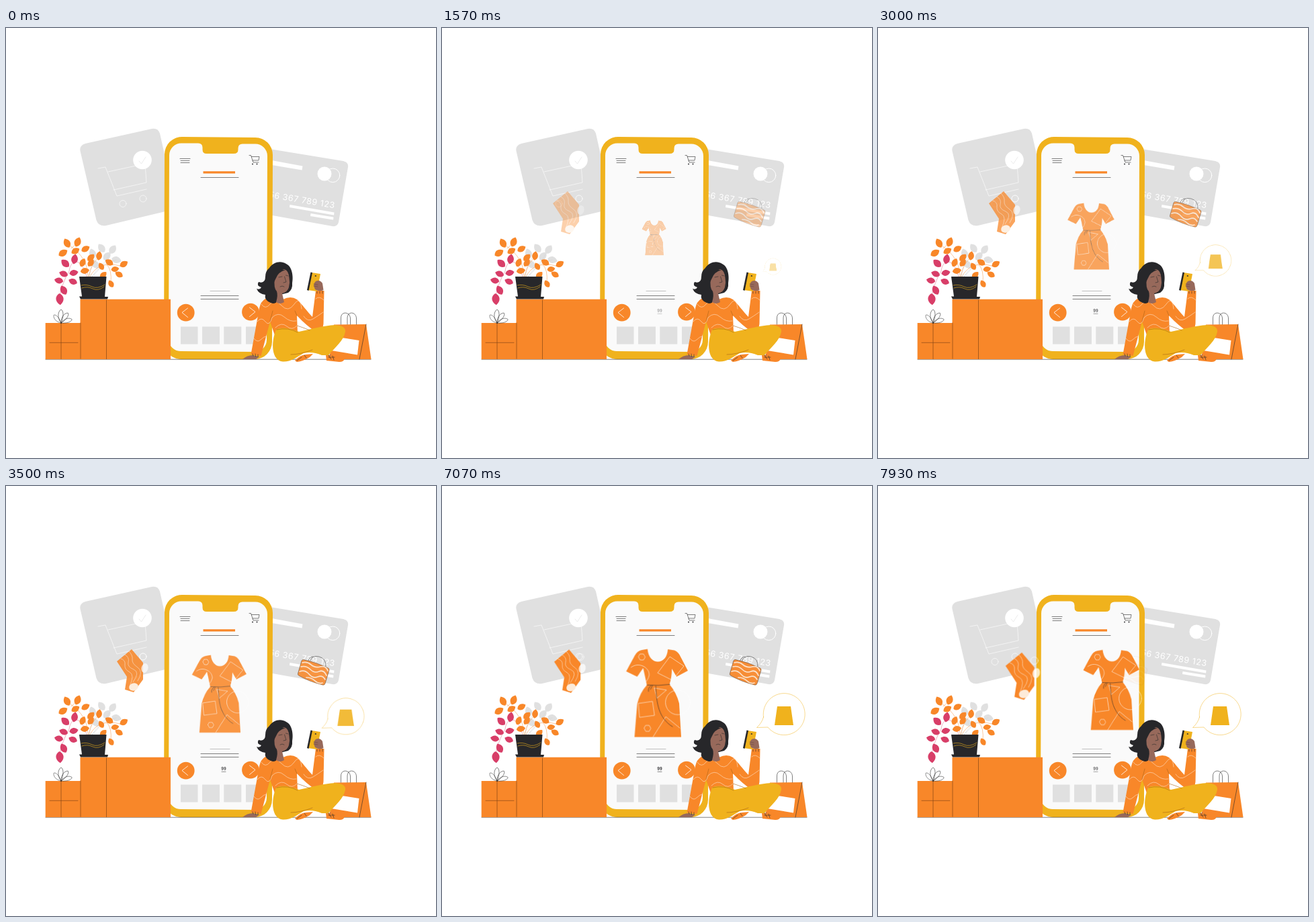
Write an HTML page that moves like this. It is 640 by 640 pixels and loops after 8000 ms.

```html
<!DOCTYPE html>
<html lang="en">
<head>
<meta charset="utf-8">
<title>Mobile shopping</title>
<style>
  html, body { margin: 0; width: 100%; height: 100%; overflow: hidden; background: #fff; }
  svg { display: block; width: 100%; height: 100%; }

  .o { fill: #f88729; }
  .y { fill: #f0b21d; }
  .g { fill: #e0e0e0; }
  .k { fill: #27272a; }
  .p { fill: #d83e68; }
  .b { fill: #97695b; }
  .w { fill: #fff; }
  .line { fill: none; stroke: #2b2b2b; stroke-width: .6; stroke-linecap: round; stroke-linejoin: round; }
  .white { stroke: #fff; }
  .pale { stroke: #fde3cb; }
  .gold { stroke: #f0b21d; }

  .dress, .sock, .bag, .bubble, .price { animation: 8s linear infinite; }
  .dress { transform-origin: 314.2px 314.6px; animation-name: dress; }
  .sock { transform-origin: 187px 275px; animation-name: sock; }
  .bag { animation-name: bag; }
  .bubble { transform-origin: 482px 365px; animation-name: bubble; }
  .price { animation-name: price; }

  @keyframes dress {
    0% { opacity: 0; transform: translate(0, 0) scale(0); }
    50%, 87.5% { opacity: 1; transform: translate(0, 0) scale(1); }
    100% { opacity: 1; transform: translate(32px, -6px) scale(.896); }
  }
  @keyframes sock {
    0% { opacity: 0; transform: translate(0, 0) scale(1); }
    50%, 87.5% { opacity: 1; transform: translate(0, 0) scale(1); }
    100% { opacity: 1; transform: translate(29px, 8.6px) scale(1.108); }
  }
  @keyframes bag {
    0% { opacity: 0; transform: translate(0, 0); }
    50%, 87.5% { opacity: 1; transform: translate(0, 0); }
    100% { opacity: 0; transform: translate(-86px, 0); }
  }
  @keyframes bubble {
    0% { opacity: 0; transform: scale(0); }
    50%, 100% { opacity: 1; transform: scale(1); }
  }
  @keyframes price {
    0% { opacity: 0; }
    50%, 87.5% { opacity: 1; }
    100% { opacity: .7; }
  }
</style>
</head>
<body>
<svg viewBox="0 0 640 640">
  <defs>
    <path id="leaf" d="M0-8C7-3 6 4 0 7C-6 4-7-3 0-8Z"/>
    <path id="petal" d="M0 0C-7-9-4-18 0-20C4-18 4-9 0 0Z"/>
  </defs>

  <!-- cart card -->
  <path class="g" d="M110.500 183Q109 175 118 172L217 150Q226 148 229 157L254 269L149 294Q138 296 134.500 286Z"/>
  <circle class="w" cx="203" cy="196.500" r="13.800"/>
  <path class="line" style="stroke:#ddd" d="M198 198L201.500 202L208 192"/>
  <g class="line white">
    <path d="M137 209L148 207L165 250L209 240M152 214L207 202L209 230L160 241"/>
    <circle cx="174" cy="261.500" r="5"/>
    <circle cx="204" cy="254" r="5"/>
  </g>

  <!-- payment card -->
  <path class="g" d="M380 178L502 198Q510 200 509 207L495 289Q493 296 486 295L380 276Z"/>
  <path class="w" d="M390 196L441.500 205.500L440.500 211.500L390 203ZM422.500 263L488.500 274.500L488 278.500L422 267ZM453.500 276L487.500 281.500L487 285.500L453 280Z"/>
  <circle class="w" cx="474" cy="217" r="10.500"/>
  <circle class="line white" cx="486.500" cy="219.300" r="10.300" style="stroke-width:1"/>
  <text class="w" transform="translate(489 268.500) rotate(9.500)" text-anchor="end" font-family="Inter, sans-serif" font-size="12.600" letter-spacing=".55">56 367 789 123</text>

  <!-- phone -->
  <path class="y" d="M262 162L371 163A26 26 0 0 1 397 189L396 467A26 26 0 0 1 370 493H261A26 26 0 0 1 235 467L236 188A26 26 0 0 1 262 162Z"/>
  <path fill="#fafafa" d="M261 171.500H286Q292.500 171.500 292.500 178V181Q292.500 187 298.500 187H339Q345.500 187 345.500 181V179Q345.500 172.500 352 172.500H371A18 18 0 0 1 389 190.500L388 464A18 18 0 0 1 370 482L260 481A18 18 0 0 1 242 463L243 189.500A18 18 0 0 1 261 171.500Z"/>
  <path class="line" d="M259 194.500H274M260 197.500H273M260 200.500H273M290 222.500H346M290 398.500H346M290 403.500H346"/>
  <path class="line" style="stroke:#999" d="M304 391.500H333"/>
  <path class="line" d="M362 189.500H364.500L368 200H376M365.500 191.500H377L376 197H367"/>
  <circle class="k" cx="367" cy="202.500" r=".9"/>
  <circle class="k" cx="373.500" cy="202.500" r=".9"/>
  <path class="o" d="M293.500 213.300H341V216.500H293.500Z"/>
  <circle class="o" cx="267.700" cy="423.700" r="12.900"/>
  <circle class="o" cx="364" cy="422.700" r="12.900"/>
  <path class="line white" style="stroke-width:.8" d="M270.500 417L262 423.500L270.500 430.500M362.500 416L371 422.500L362.500 429.500"/>
  <path class="g" d="M260 444.500H285.500V470.500H260ZM292 444.500H318V470.500H292ZM324.300 444.500H350.300V470.500H324.300ZM357 444.500H383V470.500H357Z"/>
  <path class="line" d="M59 493.200H543"/>

  <!-- boxes -->
  <path class="o" d="M58.700 439H110.500V403.700H245V493H58.700Z"/>
  <path class="line" style="stroke:#743d12" d="M82 440V492.500M65 468.300H107M149.500 405V492.500M111 439V492"/>
  <g class="line">
    <use href="#petal" transform="translate(82 439)"/>
    <use href="#petal" transform="translate(82 439) rotate(-42) scale(.8)"/>
    <use href="#petal" transform="translate(82 439) rotate(35) scale(.9)"/>
    <use href="#petal" transform="translate(82 439) rotate(72) scale(.85)"/>
  </g>

  <!-- plant -->
  <g class="g">
    <use href="#leaf" transform="translate(142.500 328) rotate(-35)"/>
    <use href="#leaf" transform="translate(158.500 330) rotate(35)"/>
    <use href="#leaf" transform="translate(129 336) rotate(-20)"/>
    <use href="#leaf" transform="translate(150 340) rotate(40)"/>
    <use href="#leaf" transform="translate(164 345) rotate(105)"/>
    <use href="#leaf" transform="translate(133 352) rotate(-40)"/>
  </g>
  <path class="line" style="stroke:#d6d6d6" d="M124 370Q126 350 134 342M128 370Q142 358 154 337M128 370Q140 350 164 345"/>
  <path class="line" style="stroke:#f6a15b" d="M122 370Q122 342 95 324M97 328L107 319M123 370Q128 348 138 342M125 370Q137 346 170 354M150 352Q158 360 156 379"/>
  <path class="line" style="stroke:#e27c98" d="M120 370C112 340 96 344 94 362Q82 382 80 402"/>
  <g class="o">
    <use href="#leaf" transform="translate(91 320.500) rotate(-28)"/>
    <use href="#leaf" transform="translate(106.500 319) rotate(22)"/>
    <use href="#leaf" transform="translate(84.500 335) rotate(58)"/>
    <use href="#leaf" transform="translate(103 332) rotate(60) scale(.9)"/>
    <use href="#leaf" transform="translate(118 329) rotate(62) scale(.9)"/>
    <use href="#leaf" transform="translate(114 349.500) rotate(25) scale(.9)"/>
    <use href="#leaf" transform="translate(126 342) rotate(45) scale(.9)"/>
    <use href="#leaf" transform="translate(138.500 339.500) rotate(8) scale(.9)"/>
    <use href="#leaf" transform="translate(126 350) rotate(40) scale(.85)"/>
    <use href="#leaf" transform="translate(154 349) rotate(-58) scale(.9)"/>
    <use href="#leaf" transform="translate(117 361.500) rotate(80) scale(.9)"/>
    <use href="#leaf" transform="translate(142 355) rotate(-30) scale(.8)"/>
    <use href="#leaf" transform="translate(144.500 368) rotate(45) scale(.85)"/>
    <use href="#leaf" transform="translate(175 351.500) rotate(58) scale(.9)"/>
    <use href="#leaf" transform="translate(162 359) rotate(80) scale(.8)"/>
    <use href="#leaf" transform="translate(168.500 367) rotate(-60) scale(.85)"/>
    <use href="#leaf" transform="translate(156.500 381) rotate(-30) scale(.8)"/>
  </g>
  <g class="p">
    <use href="#leaf" transform="translate(102 344.500) rotate(10)"/>
    <use href="#leaf" transform="translate(88.500 350.500) rotate(-48)"/>
    <use href="#leaf" transform="translate(100.500 364.500) rotate(78) scale(.9)"/>
    <use href="#leaf" transform="translate(86 366) rotate(-70) scale(.9)"/>
    <use href="#leaf" transform="translate(100 377.500) rotate(-68) scale(.9)"/>
    <use href="#leaf" transform="translate(79 376) rotate(-78) scale(.9)"/>
    <use href="#leaf" transform="translate(86 390.500) rotate(-28)"/>
    <use href="#leaf" transform="translate(80 403) rotate(175) scale(1.150)"/>
  </g>
  <path class="k" d="M109 370H149.500L147 400H152L151 403.500H111L109 399.500H113Z"/>
  <path class="line gold" d="M112 383Q120 381 128 385T147 382M113 387Q121 384 129 388T146 385"/>

  <!-- shopping bag -->
  <path class="o" d="M488 441.500L536 441L543.500 493H481Z"/>
  <path class="w" d="M493 460L525.500 465L523 486.500L478 479Z"/>
  <path class="line" d="M498.500 441V432C498 421 512 422 512.500 432V441M508 441V432C508 421 521 422 521.500 432V441M536 441L526 493"/>

  <!-- woman -->
  <path class="b" d="M352 493Q359 487 367 487L377 489L372 493Z"/>
  <path class="b" d="M477 488L483 486L488 494L479 494Z"/>
  <path class="o" d="M476 487Q488 487 497 491L504 492Q503 497 496 497L477 495Z"/>
  <path class="o" d="M386 403Q398 399 412 404Q424 398 433 404C441 411 448 422 456 430L461 391L473.500 391L472.500 440Q471 454 463 453.500Q448 444 433 428L434 455L400 457L393 437L379.500 488L364.500 486L377 417Q379 407 386 403Z"/>
  <path class="y" d="M402 449Q412 443 436 452C455 448 472 443 490 442Q506 443 505 452C503 465 489 476 480 487H470Q456 481 443 484C431 491 424 497 412 496.500C395 495 394 468 402 449Z"/>
  <path class="o" d="M430 495Q437 487 446 486L457 485L452 490Q442 496 433 497Z"/>
  <path class="line" style="stroke:#a96415" d="M393 437L397 421M433 428L430 421M424 486Q438 486 456 479M433 443Q446 447 452 450M403 449Q420 445 434 453"/>
  <path class="line pale" d="M380 411Q386 420 393 411T410 413T429 411T440 418M374 437Q380 429 386 437T396 431Q405 422 414 430T432 436M401 446Q410 437 418 444T433 443M369 462Q374 469 379 464T387 459M443 429Q449 438 457 433T472 423M461 403Q466 398 473 405"/>
  <path class="line" d="M367 485L368 488M371 485L371.500 489M375 486L375 489M463 392V395M467 392V395M471 391.500V395M433 495L440 490M444 487L447 491M480 487L484 493M486 488L488 494M480 490H489"/>
  <path class="k" d="M392 357C398 348 409 346 417 351C426 355 428 370 426 380Q427 389 420 394L412 396Q404 396 404 405Q402 412 394 409Q384 405 386 397Q376 396 373 388Q378 390 380 386Q372 383 376 378Q386 381 386 370Q386 362 392 357Z"/>
  <path class="b" d="M400 372Q405 361 414 359Q421 361 421.500 372Q423 379 421 386Q419 393 411 395L414 408Q408 412 402 408Q405 398 403 392Q398 387 400 372Z"/>
  <path class="k" d="M397 382Q399 378 401.500 373Q405 363 416 360L397 360Z"/>
  <path class="line" d="M406 371L411 370M416.500 368L420 369M414.500 370L417 378L413 379M408 385Q411 383 414 385"/>
  <path class="y" d="M455 364L468 366L463 392L449 390Z"/>
  <path class="k" d="M453.500 363.500L456 364L450.500 391L448 390Z"/>
  <path class="k" d="M460 368L462 368.400L461.500 370L459.600 369.600Z"/>
  <path class="b" d="M460 389Q456 381 461 377Q467 374 471 380L472.500 390Q466 393 460 389Z"/>
  <path class="line" style="stroke:#70493e" d="M458 381L464 382M458 384L464 385"/>

  <g class="sock">
    <path class="o" d="M187 243L204 263L204 288L190 307L177 303L180 284L165 261Z"/>
    <ellipse cx="206.500" cy="271" rx="5" ry="7" fill="#fff" fill-opacity=".75" transform="rotate(15 206.500 271)"/>
    <ellipse cx="190" cy="299" rx="7" ry="5.500" fill="#fdebd9" transform="rotate(-20 190 299)"/>
    <path class="line pale" d="M171 257Q178 259 177 266T184 277T184 298M177 251Q184 255 182 262T190 273T189 292M183 246Q189 252 188 258T196 270T196 290"/>
    <circle class="line white" cx="204" cy="254" r="5"/>
  </g>

  <g class="bag">
    <path class="line" d="M452 262Q455 251 466 254T476 269M449 261Q452 254 457 254"/>
    <path class="o" stroke="#3a2415" stroke-width=".5" d="M443 258.500Q461 262 479.500 271Q481.500 272 481 274L475 294Q474 297 471 296Q451 291 435.500 282Q434 281 434.500 279L440 260Q441 258 443 258.500Z"/>
    <path class="line pale" style="stroke-width:1.700" d="M441 263Q448 261 454 266T468 269T479 275M439 269Q447 267 453 273T466 276T477 282M437 276Q445 273 451 280T464 284T475 288M447 285Q455 285 460 290T471 293"/>
  </g>

  <g class="dress">
    <path class="o" d="M295 244L303.500 242.500C305 256 312 261.500 319 261.500C327 261.500 333 255 334 243L344 244.500Q350 247 353 254L364 275L347 284L340 272Q340 285 336.500 295.500Q347 308 351 324L354 374.500H284L288 325Q292 308 302.500 296.500L297 271L288 284L271.500 276L284 253Q288 245 295 244Z"/>
    <g class="line white">
      <path d="M292.500 250L297.500 250L300 254.500L297.500 259L292.500 259L290 254.500ZM301 357H306L308.500 361.500L306 366H301L298.500 361.500ZM290 324L311 321L314 342L292 345ZM319 278L337 254L358 268L341 289ZM314 301L332 304L318 316ZM312 374L331 344L352 361"/>
      <path d="M279 270C290 261 307 270 306 282Q304 290 299 293"/>
      <circle cx="349" cy="322.500" r="18.500"/>
    </g>
    <path class="line" d="M303 296.500Q320 298 337 295.500M309 297Q304 301 305 306M311 297L308 303M316 298C317 324 320 346 341 359"/>
  </g>

  <g class="price">
    <text class="k" x="324" y="423.300" text-anchor="middle" font-family="Inter, sans-serif" font-weight="700" font-size="5.600">99</text>
    <path class="line" d="M321 425.300H327"/>
  </g>

  <g class="bubble">
    <path class="line gold" style="stroke-width:.5" d="M478.500 344A31 31 0 1 1 485 359L468.500 359.500Q476 353 478.500 344Z"/>
    <path class="y" d="M499 328H519L523 356H495Z"/>
  </g>
</svg>
</body>
</html>
```
